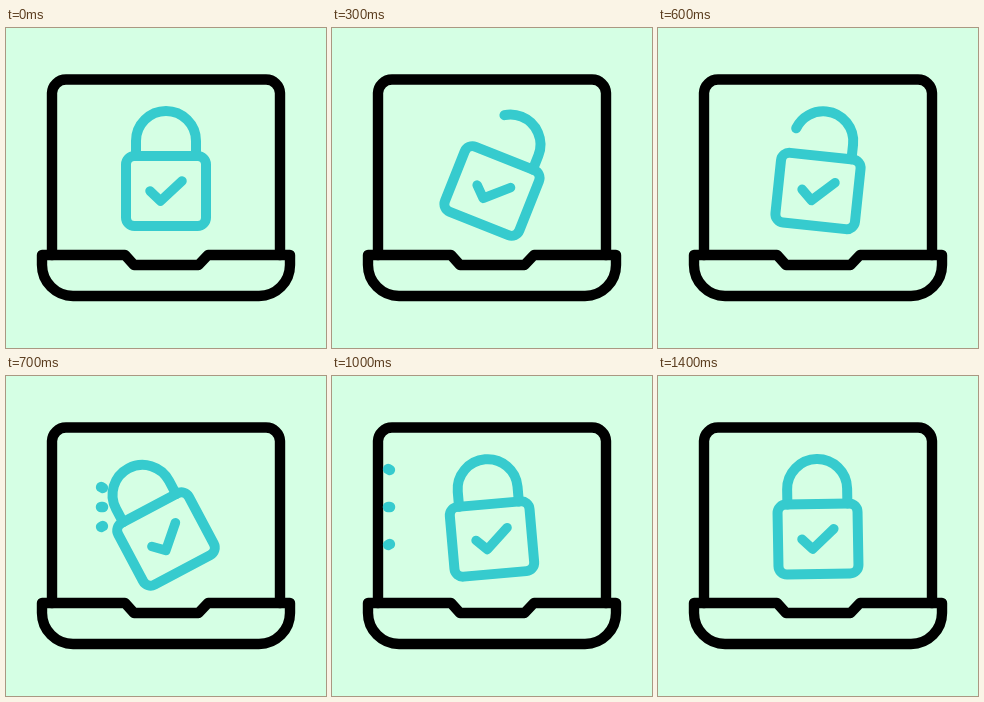
These frames come from a looping animation (320 px wide and 320 px high, 1.5 s). An HTML page:

```html
<!DOCTYPE html>
<html lang="en">
<head>
<meta charset="utf-8">
<title>Laptop lock</title>
<style>
  html, body { margin: 0; width: 100%; height: 100%; overflow: hidden; background: #d5ffe4; }
  svg { display: block; width: 100%; height: 100%; }
  svg * { fill: none; stroke-linecap: round; stroke-linejoin: round; }
  .laptop { stroke: #000; stroke-width: 10.4; }
  .teal { stroke: #36cbce; stroke-width: 10; }
</style>
</head>
<body>
<svg viewBox="0 0 320 320">
  <g class="laptop">
    <path d="M46 227V65A14 14 0 0 1 60 51.5H260A14 14 0 0 1 274 65V227"/>
    <path d="M36 227H119L128 237H192.500L202 227H284V237A31 31 0 0 1 253 268H67A31 31 0 0 1 36 237Z"/>
  </g>
  <g class="teal">
    <g id="lock">
      <path id="shackle" d="M190 128V113A30 30 0 0 0 130 113V128"/>
      <rect x="120" y="128" width="80" height="70" rx="8.500"/>
      <path d="M144 163L154.500 173L176 153" stroke-width="9.500"/>
    </g>
    <g id="sparks" stroke-width="10.500"><path/><path/><path/></g>
  </g>
</svg>
<script>
const LOOP = 1500, STEP = 100;
const OPEN = 500, SHUT = 700, CALM = 900, SPARK_END = 1000;
const SHACKLE = 30 + 30 * Math.PI;
const SWING = 40, RECOIL = -28, GAP = 51;

const lock = document.getElementById("lock");
const shackle = document.getElementById("shackle");
const sparks = [...document.querySelectorAll("#sparks path")];

const clamp = x => Math.min(1, Math.max(0, x));
const span = (t, a, b) => clamp((t - a) / (b - a));
const mix = (a, b, p) => a + (b - a) * p;

// Swing open, snap shut past upright, then a quick and a slow return
function tilt(t) {
  if (t < SHUT) return mix(SWING * span(t, 0, OPEN) ** 1.2, RECOIL, span(t, OPEN, SHUT));
  return -20 * (1 - span(t, SHUT, CALM)) - 8 * (1 - span(t, SHUT, LOOP));
}

function gap(t) {
  const opened = 1 - (1 - span(t, 0, OPEN)) ** 2.3;
  return GAP * opened * (1 - span(t, OPEN, SHUT));
}

function drawSpark(path, i, t) {
  const side = i - 1;
  const s = (t - SHUT) / (CALM - SHUT);
  const dx = -26, dy = side * 12;
  const x = 96 + dx * s, y = 131 + side * 19.5 + dy * s;
  const n = Math.hypot(dx, dy), ux = dx / n, uy = dy / n;
  path.setAttribute("d", `M${x - ux} ${y - uy}L${x + ux} ${y + uy}`);
  path.setAttribute("display", t >= SHUT && t <= SPARK_END ? "inline" : "none");
}

function draw(t) {
  lock.setAttribute("transform", `rotate(${tilt(t)} 160 163)`);
  shackle.setAttribute("stroke-dasharray", `${SHACKLE - gap(t)} 300`);
  sparks.forEach((path, i) => drawSpark(path, i, t));
}

const start = performance.now();
function tick() {
  const t = (performance.now() - start) % LOOP;
  draw(Math.floor(t / STEP) * STEP);
  requestAnimationFrame(tick);
}
draw(0);
requestAnimationFrame(tick);
</script>
</body>
</html>
```
